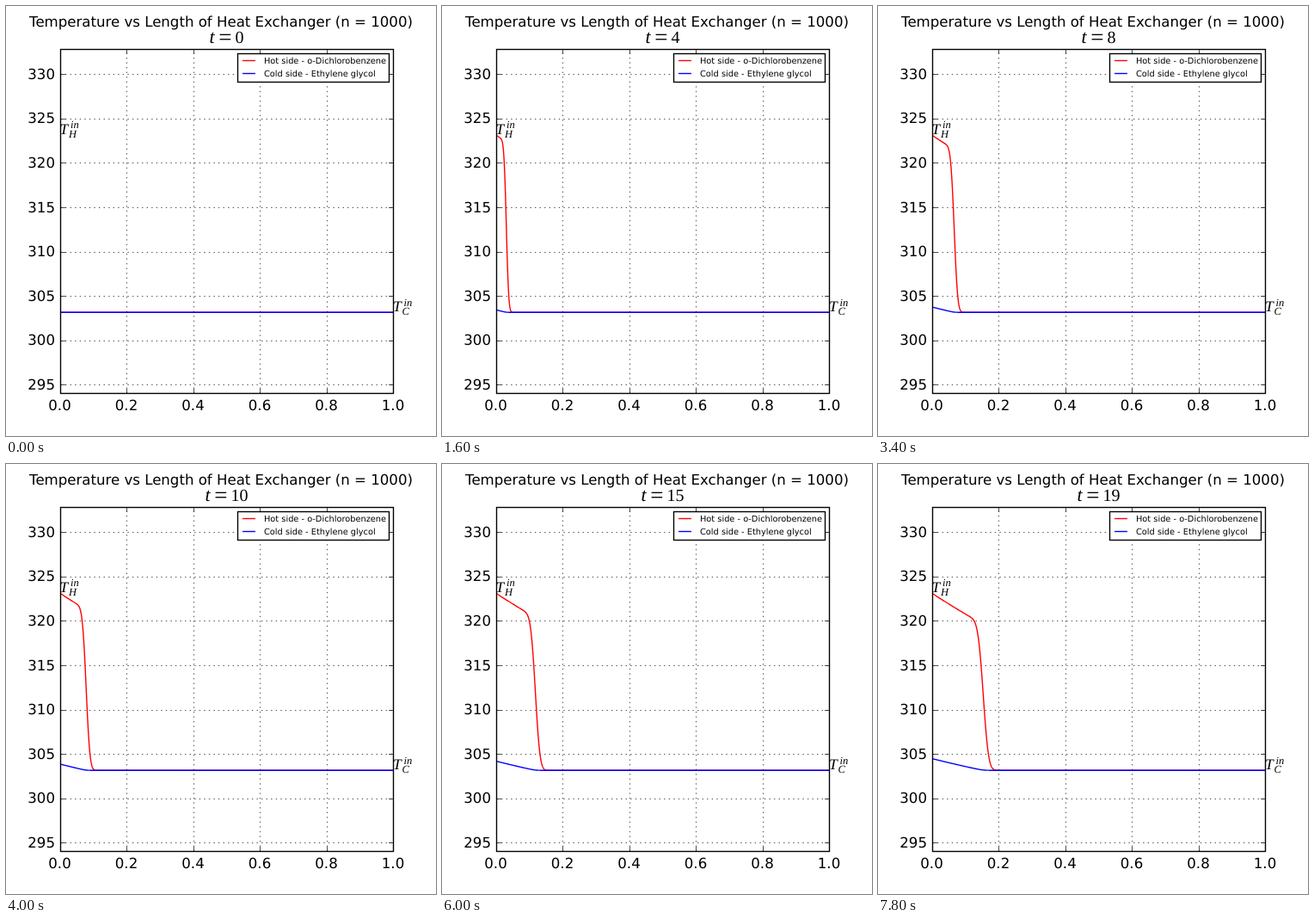
An HTML page for the animation above (8 s loop, 500 by 500 pixels).

```html
<!DOCTYPE html>
<html lang="en">
<head>
<meta charset="utf-8">
<title>Heat exchanger temperatures</title>
<style>
  html, body { margin: 0; width: 100%; height: 100%; overflow: hidden; background: #fff; }
  svg { display: block; width: 100%; height: 100%; }
  text { font: 16.6px "DejaVu Sans", sans-serif; text-rendering: geometricPrecision; }
  .legend text { font-size: 9.8px; }
  .math text { font: 20px "Liberation Serif", serif; }
  .math .var { font-style: italic; }
  .math .base { font-size: 17.5px; font-style: italic; }
  .math .script { font-size: 12.5px; font-style: italic; }
  .grid { stroke: #000; stroke-width: .69; stroke-dasharray: 1.39 4.17; }
  .tick { stroke: #000; stroke-width: .69; }
  .line { fill: none; stroke-width: 1.39; stroke-linejoin: round; }
  .box { fill: none; stroke: #000; stroke-width: 1.39; }
</style>
</head>
<body>
<svg viewBox="0 0 500 500">
  <clipPath id="plot"><rect x="63" y="50" width="387" height="400"/></clipPath>
  <g id="grid"></g>
  <g clip-path="url(#plot)">
    <path id="hot" class="line" stroke="#f00"/>
    <path id="cold" class="line" stroke="#00f"/>
  </g>
  <g id="axes"></g>
  <rect class="box" x="63.5" y="50.5" width="387" height="400"/>
  <text x="250" y="24" text-anchor="middle">Temperature vs Length of Heat Exchanger (n = 1000)</text>
  <g class="math" id="clock">
    <text class="var" x="236.5" y="43" style="font-size:22px">t</text>
    <text x="247.3" y="45" style="font-size:27px">=</text>
    <text id="count" x="266.5" y="43">0</text>
  </g>
  <g class="math" id="inlets"></g>
  <g class="legend">
    <rect class="box" x="269.5" y="55.5" width="176" height="33" style="fill:#fff"/>
    <path class="line" stroke="#f00" d="M275 63.5h15"/>
    <path class="line" stroke="#00f" d="M275 78.5h15"/>
    <text x="300" y="67">Hot side - o-Dichlorobenzene</text>
    <text x="300" y="82">Cold side - Ethylene glycol</text>
  </g>
</svg>
<script>
const $ = id => document.getElementById(id);
const HOT_IN = 323.15, COLD_IN = 303.15;
const Y_MIN = COLD_IN * 0.97, Y_MAX = HOT_IN * 1.03;
const WIDTH = 387.5, CELLS = 1000;
const px = x => 62.5 + WIDTH * x;
const py = temp => 450 - 400 * (temp - Y_MIN) / (Y_MAX - Y_MIN);
const snap = v => Math.round(v) + 0.5;

function add(parent, tag, attrs, text = '') {
  const el = document.createElementNS('http://www.w3.org/2000/svg', tag);
  for (const name in attrs) el.setAttribute(name, attrs[name]);
  el.textContent = text;
  parent.append(el);
}

for (let i = 0; i <= 5; i++) {
  const x = snap(px(i / 5));
  if (i % 5) {
    add($('grid'), 'path', { class: 'grid', d: `M${x} 450.5V50.5` });
    add($('axes'), 'path', { class: 'tick', d: `M${x} 450.5v-5.5M${x} 50.5v5.5` });
  }
  add($('axes'), 'text', { x: px(i / 5), y: 470, 'text-anchor': 'middle' }, (i / 5).toFixed(1));
}
for (let temp = 295; temp <= 330; temp += 5) {
  const y = snap(py(temp));
  add($('grid'), 'path', { class: 'grid', d: `M63.5 ${y}H450.5` });
  add($('axes'), 'path', { class: 'tick', d: `M63.5 ${y}h5.5M450.5 ${y}h-5.5` });
  add($('axes'), 'text', { x: 57, y: Math.floor(py(temp)) + 6, 'text-anchor': 'end' }, temp);
}

function inletLabel(x, y, side) {
  const put = (cls, dx, dy, text) => add($('inlets'), 'text', { class: cls, x: x + dx, y: y + dy }, text);
  put('base', 0, 0, 'T');
  put('script', 12.5, -6.5, 'in');
  put('script', 10.5, 4, side);
}
inletLabel(62.5, py(HOT_IN) - 1, 'H');
inletLabel(450, py(COLD_IN) - 1, 'C');

// Logistic approximation of the normal upper tail.
const tail = z => 1 / (1 + Math.exp(1.5976 * z + 0.07056 * z ** 3));

// An advected front, smeared by cell size; the cold stream gains heat from right to left.
function profiles(t) {
  const front = 3.08 * t / WIDTH;
  const spread = Math.sqrt(front / CELLS);
  const hot = [], cold = [];
  let gain = 0;
  for (let i = CELLS; i >= 0; i--) {
    const x = i / CELLS;
    const excess = (HOT_IN - COLD_IN) * Math.exp(-1.25 * x) * (i ? tail((x - front) / spread) : 1);
    hot[i] = COLD_IN + excess;
    cold[i] = COLD_IN + gain;
    gain += 0.475 * excess / CELLS;
  }
  return { hot, cold };
}

const curve = temps => 'M' + temps.map((temp, i) =>
  `${px(i / CELLS).toFixed(2)} ${py(temp).toFixed(2)}`).join('L');

let shown = -1;
function draw(now) {
  const step = Math.floor(now % 8000 / 200);
  if (step !== shown) {
    shown = step;
    const t = step / 2, count = Math.floor(t);
    const { hot, cold } = profiles(t);
    $('hot').setAttribute('d', curve(hot));
    $('cold').setAttribute('d', curve(cold));
    $('count').textContent = count;
    $('clock').setAttribute('transform', `translate(${count > 9 ? -5 : 0})`);
  }
  requestAnimationFrame(draw);
}
draw(performance.now());
</script>
</body>
</html>
```
